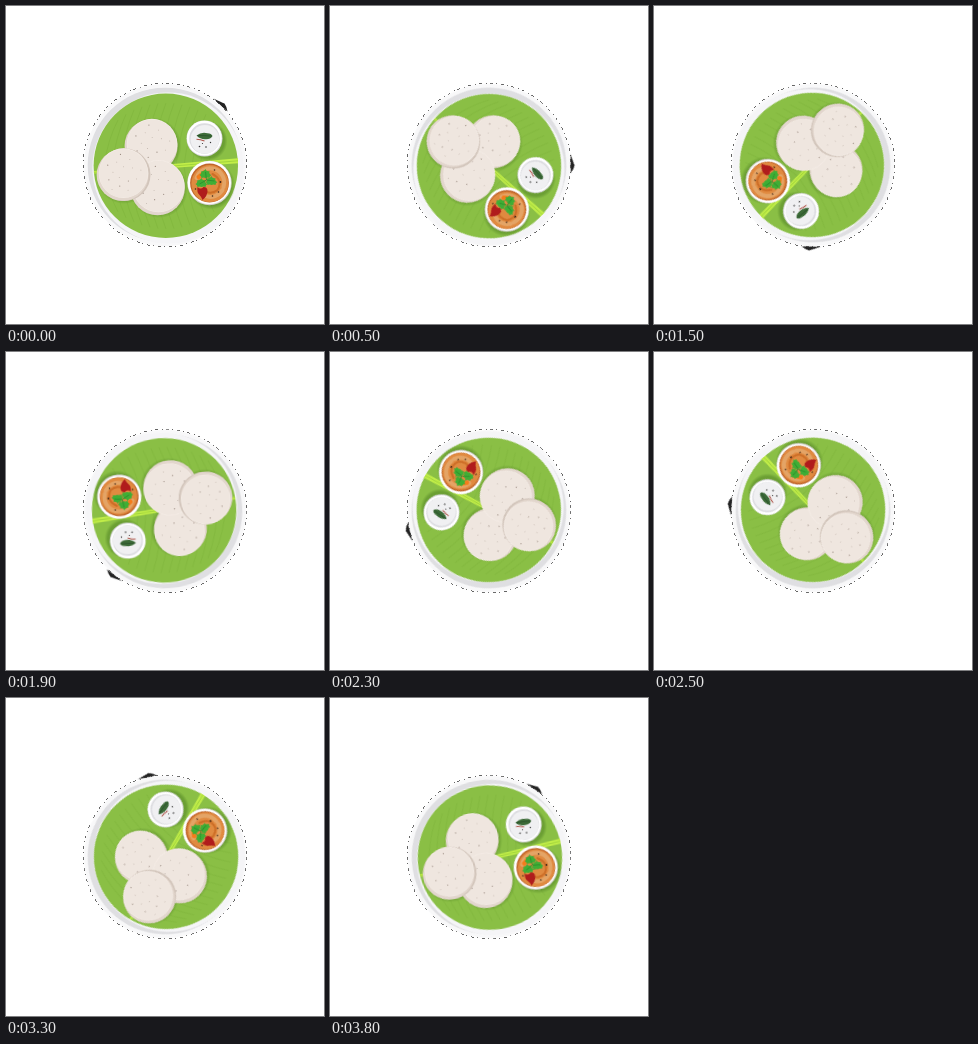
These frames come from a looping animation (318 px wide and 318 px high, 3.9 s). An HTML page:

```html
<!DOCTYPE html>
<html lang="en">
<head>
<meta charset="utf-8">
<title>Spinning plate</title>
<style>
  html, body { margin: 0; width: 100%; height: 100%; overflow: hidden; background: #fff; }
  svg { display: block; width: 100vw; height: 100vh; }
  #plate { transform-origin: 159px 159px; animation: spin 3900ms steps(39, end) infinite; }
  @keyframes spin { to { transform: rotate(360deg); } }
</style>
</head>
<body>
<svg viewBox="0 0 318 318">
  <defs>
    <radialGradient id="shade">
      <stop offset=".84" stop-color="#4d7f22" stop-opacity=".5"/>
      <stop offset="1" stop-color="#4d7f22" stop-opacity="0"/>
    </radialGradient>
    <g id="idli">
      <circle cx="-.4" cy=".9" r="26.5" fill="#e2d6cd"/>
      <circle cx=".5" cy="-.9" r="25.3" fill="#f4ece6"/>
      <circle cx=".5" cy="-.7" r="24.7" fill="#efe6df"/>
      <g class="specks" fill="#9b8c82"></g>
    </g>
    <path id="sprig" d="M0 4Q-2 3-4 4Q-4 2-6 1Q-4 0-4-3Q-2-2 0-5Q1-2 4-3Q3 0 6 1Q4 2 4 4Q2 3 0 4Z"/>
  </defs>

  <circle cx="159" cy="159" r="81.7" fill="none" stroke="#222" stroke-width=".7" stroke-dasharray="3 4 1 3" shape-rendering="crispEdges"/>

  <g id="plate">
    <path d="M207.5 92.5Q215 96 218.5 97.5Q221 101 221.5 105.5L217.5 102Z" fill="#222"/>
    <circle cx="159" cy="159" r="81" fill="#f8f8f9"/>
    <circle cx="159" cy="159" r="77.3" fill="#dfdfe2"/>
    <circle cx="162" cy="162" r="75.6" fill="#f5f5f7"/>
    <circle cx="159.8" cy="159.8" r="72.2" fill="#8abf45"/>
    <g id="veins" fill="none" stroke="#74aa33" stroke-width=".6" opacity=".5"></g>
    <path d="M88 165L232 152.3V157.2L88 167.4Z" fill="#c2ee48"/>
    <path d="M88 166.3L232 154.8" stroke="#9ace3a" stroke-width=".8"/>

    <g fill="url(#shade)">
      <circle cx="147" cy="140" r="28.5"/>
      <circle cx="153" cy="183" r="29"/>
      <circle cx="118" cy="170" r="28"/>
    </g>
    <use href="#idli" x="145.5" y="139"/>
    <use href="#idli" transform="translate(152 181) scale(1.03)"/>
    <circle cx="118.2" cy="168.6" r="26.3" fill="#d2c5bb"/>
    <use href="#idli" transform="translate(117 168) scale(.98)"/>

    <g transform="translate(198.5 132.5)">
      <circle cx="3" cy="2.5" r="20" fill="url(#shade)"/>
      <circle r="18" fill="#d6d6da"/>
      <circle cx="-.2" cy="-.3" r="17.4" fill="#fff"/>
      <circle r="15.2" fill="#dcdce0"/>
      <circle cx=".4" cy=".8" r="14.3" fill="#f0f0f2"/>
      <path d="M-8 .8Q-4 1 0 2.5" fill="none" stroke="#b0574c" stroke-width="1.1"/>
      <path d="M-8-3Q-3-7 3-5.3Q7-5 8-2.5Q6 1 1 .7Q-4 1-8-3Z" fill="#3c6b38"/>
      <path d="M-7-3Q0-3 7-2.4" fill="none" stroke="#284d29" stroke-width=".7"/>
      <g fill="#333">
        <circle cx="-5" cy="8" r=".8"/><circle cx="1.5" cy="8.5" r=".8"/>
        <circle cx="6" cy="4" r=".7"/><circle cx="-2" cy="5" r=".6"/>
      </g>
    </g>

    <g transform="translate(203.5 177)">
      <circle cx="2" cy="2.5" r="24" fill="url(#shade)"/>
      <circle r="22.2" fill="#d5d2d0"/>
      <circle cx="-.2" cy="-.5" r="21.6" fill="#fff"/>
      <circle r="19.4" fill="#c0662a"/>
      <circle cx=".4" cy=".6" r="18.5" fill="#e08a40"/>
      <g fill="none" stroke-linecap="round">
        <path d="M-13-5A14 14 0 0 1 14 4" stroke="#e4a466" stroke-width="4"/>
        <path d="M-4 13A14 14 0 0 0 13 7" stroke="#e4a466" stroke-width="4"/>
        <path d="M3-9Q14-3 8 7Q3 11-3 9" stroke="#cd6e27" stroke-width="2"/>
        <path d="M-11-6L-5-11" stroke="#f57c1a" stroke-width="4"/>
      </g>
      <path d="M-12 4Q-9 7-6 4Q-2 4-2 8Q-2 13-7 17Q-8 14-10 12Q-13 9-12 4Z" fill="#b01c1c"/>
      <g fill="#3fae35">
        <use href="#sprig" x="-4" y="-9"/>
        <use href="#sprig" x="2" y="-2"/>
        <use href="#sprig" x="-8" y="0"/>
      </g>
      <path d="M-4-11L-3-3L5-2M-3-3L-10 1" fill="none" stroke="#2b8a2b" stroke-width=".8"/>
      <g fill="#3b2418">
        <circle cx="11" cy="-1" r=".9"/><circle cx="9" cy="9" r=".8"/><circle cx="3" cy="13" r=".8"/>
        <circle cx="5" cy="-13" r=".8"/><circle cx="-14" cy="6" r=".8"/>
      </g>
    </g>
  </g>
</svg>
<script>
  const NS = 'http://www.w3.org/2000/svg';
  const add = (parent, tag, attrs) => {
    const el = document.createElementNS(NS, tag);
    for (const key in attrs) el.setAttribute(key, attrs[key]);
    parent.append(el);
  };

  // Sunflower spread of specks on each cake
  const specks = document.querySelector('.specks');
  for (let i = 1; i < 16; i++) {
    const r = 5.2 * Math.sqrt(i), a = i * 2.4;
    add(specks, 'circle', { cx: r * Math.cos(a), cy: r * Math.sin(a), r: i % 3 ? .4 : .6 });
  }

  // Side veins sweep away from the midrib
  const veins = document.getElementById('veins');
  for (let x = 98; x < 206; x += 8) {
    const reach = Math.sqrt(70 ** 2 - (x + 14 - 160) ** 2) * .9;
    for (const side of [-1, 1]) {
      add(veins, 'path', { d: `M${x} 160q4 ${side * reach * .6} 14 ${side * reach}` });
    }
  }
</script>
</body>
</html>
```
